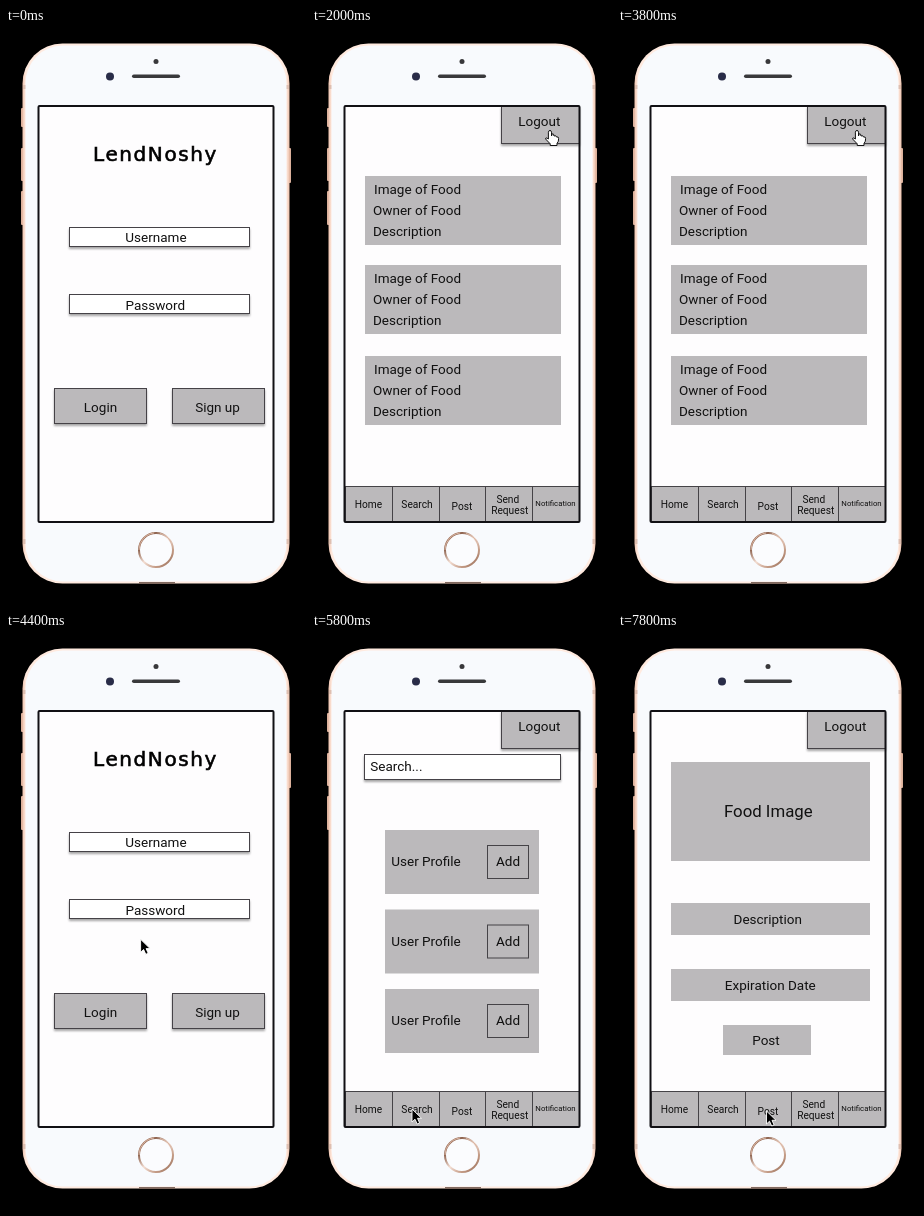
Animation, 300 px wide and 577 px high, one loop 8000 ms. Source, as an HTML page:

```html
<!DOCTYPE html>
<html lang="en">
<head>
<meta charset="utf-8">
<title>Food sharing app walkthrough</title>
<style>
html, body { margin: 0; width: 100%; height: 100%; overflow: hidden; background: #000; }
svg { display: block; width: 100%; height: 100%; }
text { font-family: Roboto, Arial, sans-serif; font-size: 13.5px; fill: #111; }
.title { font-family: "DejaVu Sans", sans-serif; font-size: 20px; letter-spacing: 1.6px; fill: #000; stroke: #000; stroke-width: .6; }
.tab { font-size: 10.2px; text-anchor: middle; }
</style>
</head>
<body>
<svg id="stage" viewBox="0 0 300 577" xmlns="http://www.w3.org/2000/svg">
  <defs>
    <linearGradient id="rim" x1="0" x2="1" y1="0" y2="0">
      <stop offset="0" stop-color="#eec3ae"/>
      <stop offset=".012" stop-color="#ffeadf"/>
      <stop offset=".988" stop-color="#ffeadf"/>
      <stop offset="1" stop-color="#eec3ae"/>
    </linearGradient>
    <linearGradient id="ring" x1="0" x2="1" y1="0" y2="1">
      <stop offset="0" stop-color="#b98970"/>
      <stop offset=".25" stop-color="#8f6551"/>
      <stop offset=".5" stop-color="#f3ddd2"/>
      <stop offset=".75" stop-color="#c39a84"/>
      <stop offset="1" stop-color="#8f6551"/>
    </linearGradient>
    <filter id="shadow" x="-10%" y="-20%" width="120%" height="160%">
      <feDropShadow dx="0" dy="2" stdDeviation="1" flood-color="#000" flood-opacity=".35"/>
    </filter>
  </defs>
  <rect width="300" height="577" fill="#000"/>

  <g id="phone">
    <g fill="#dcb19c">
      <rect x="15" y="80" width="3" height="19" rx="1"/>
      <rect x="15" y="120" width="3" height="33" rx="1"/>
      <rect x="15" y="163" width="3" height="34" rx="1"/>
      <rect x="282" y="120" width="3" height="35" rx="1"/>
    </g>
    <rect x="16.5" y="15.5" width="267" height="540" rx="40" fill="url(#rim)"/>
    <g fill="#dfbfb0">
      <rect x="17" y="57" width="3" height="4"/>
      <rect x="280" y="57" width="3" height="4"/>
      <rect x="17" y="511" width="3" height="5"/>
      <rect x="280" y="511" width="3" height="5"/>
    </g>
    <rect x="19.5" y="17.5" width="261" height="536" rx="37.5" fill="#f8fafd"/>
    <rect x="133" y="554" width="36" height="2" fill="#80695f"/>
    <circle cx="150" cy="33.5" r="2.5" fill="#38383b"/>
    <circle cx="104" cy="48.5" r="4" fill="#292c48"/>
    <rect x="126" y="46.5" width="48" height="3.5" rx="1.75" fill="#39393b"/>
    <circle cx="150" cy="522" r="17" fill="#fbfcfe" stroke="url(#ring)" stroke-width="2"/>
    <path d="M148 505A17 17 0 0 0 133 522M165 514A17 17 0 0 0 154 505.5" fill="none" stroke="#d8b5a3" stroke-width="1"/>
  </g>

  <rect x="33" y="78" width="234" height="416" fill="#fefdfe"/>
  <g id="screens"></g>
  <rect x="32.5" y="78" width="235" height="416" rx="1" fill="none" stroke="#111014" stroke-width="2"/>

  <g id="cursor">
    <path id="arrow" d="M0 0V13L3 10.2L5.2 15L7.6 14L5.5 9.3H9.5Z" fill="#000" stroke="#fff" stroke-width=".9"/>
    <path id="hand" d="M-1.6 1.2Q-1.3-.6 0-.6T1.5 1.2V5Q3-.0 4 5Q6 3.8 6.5 6Q8.6 5.2 8.6 7.6Q8.8 10.6 7 12.4V14.5H.2V12.8L-4.4 8Q-4.6 5.8-1.6 8Z" fill="#fff" stroke="#111" stroke-width="1" stroke-linejoin="round"/>
  </g>
</svg>
<script>
const LOOP = 8000, STEP = 200;
const GREY = '#bbb9bb', WHITE = '#fff', LINE = '#454347';
const byId = id => document.getElementById(id);

const box = (x, y, w, h, fill = GREY, extra = '') =>
  `<rect x="${x}" y="${y}" width="${w}" height="${h}" fill="${fill}" ${extra}/>`;
const outline = (x, y, w, h, fill) =>
  box(x + .5, y + .5, w - 1, h - 1, fill, `stroke="${LINE}"`);
const raised = (...args) => `<g filter="url(#shadow)">${outline(...args)}</g>`;
const label = (x, y, str, extra = '') => `<text x="${x}" y="${y}" ${extra}>${str}</text>`;
const mid = (x, y, str, size = 13.5) =>
  label(x, y, str, `text-anchor="middle" style="font-size:${size}px"`);
const tab = (x, y, str, size = 10.2) => label(x, y, str, `class="tab" style="font-size:${size}px"`);

// Parts shared by every screen behind the login
const frame = () =>
  raised(189, 78, 79, 38) + label(206.3, 98, 'Logout') +
  [33, 80, 127, 173, 220].map((x, i, all) =>
    outline(x, 458, (all[i + 1] || 267) - x + 1, 36)).join('') +
  tab(56.5, 480, 'Home') + tab(105, 480, 'Search') + tab(150, 481.5, 'Post') +
  tab(195.8, 474.5, 'Send') + tab(197.7, 486, 'Request') + tab(243.5, 478, 'Notification', 7.8);

const foodCard = y =>
  box(53, y, 196, 69) + label(62, y + 18, 'Image of Food') +
  label(61, y + 39, 'Owner of Food') + label(61, y + 59.7, 'Description');

const userCard = y =>
  box(73, y, 154, 64) + label(79.3, y + 36, 'User Profile') +
  outline(175, y + 15, 42, 34) + mid(196, y + 36, 'Add');

const screens = {
  login:
    label(87, 133, 'LendNoshy', 'class="title"') +
    raised(63, 199, 181, 20, WHITE) + mid(150, 214, 'Username') +
    raised(63, 266, 181, 20, WHITE) + mid(149.3, 282, 'Password') +
    raised(48, 360, 93, 36) + mid(94.5, 384, 'Login') +
    raised(166, 360, 93, 36) + mid(211.5, 384, 'Sign up'),
  home: frame() + [148, 237, 328].map(foodCard).join(''),
  search: frame() + raised(52, 121, 197, 26, WHITE) + label(58.3, 138, 'Search...') +
    [197, 276.5, 356].map(userCard).join(''),
  post: frame() +
    box(53, 129, 199, 99) + mid(150.3, 184, 'Food Image', 16.8) +
    box(53, 270, 199, 32) + mid(149.7, 290.5, 'Description') +
    box(53, 336, 199, 32) + mid(152.3, 356.5, 'Expiration Date') +
    box(105, 392, 88, 30) + mid(148, 412, 'Post')
};

byId('screens').innerHTML = Object.entries(screens)
  .map(([name, body]) => `<g id="${name}">${body}</g>`).join('');

// When each screen opens
const visits = [
  [0, 'login'], [1000, 'home'], [2200, 'login'], [3000, 'home'],
  [4000, 'login'], [4800, 'home'], [5800, 'search'], [7800, 'post']
];

// Pointer stops: time, x, y
const path = [
  [200, 258, 330], [800, 111.5, 382], [1200, 111.5, 382],
  [2000, 238, 103], [2200, 238, 103], [2800, 233, 375], [3200, 233, 375],
  [3800, 239, 103], [4000, 239, 103], [4600, 98, 377.5], [5000, 98, 377.5],
  [5600, 100, 476], [6000, 100, 476], [6600, 192, 318], [7200, 154, 450],
  [7400, 154, 450], [7600, 148.5, 478], [8000, 148.5, 478]
];
const pressing = [800, 2000, 2800, 3800, 4600, 5600, 6600, 7600];

const ease = p => p * p * (3 - 2 * p);

function pointerAt(t) {
  const i = Math.max(1, path.findIndex(k => k[0] >= t));
  const [t0, x0, y0] = path[i - 1], [t1, x1, y1] = path[i];
  const p = ease((t - t0) / (t1 - t0));
  return [x0 + (x1 - x0) * p, y0 + (y1 - y0) * p];
}

const show = (id, on) => byId(id).setAttribute('display', on ? 'inline' : 'none');

function draw(ms) {
  const t = Math.floor(ms % LOOP / STEP) * STEP;
  const current = visits.filter(v => v[0] <= t).pop()[1];
  for (const name in screens) show(name, name === current);

  show('cursor', t >= path[0][0]);
  if (t >= path[0][0]) {
    const [x, y] = pointerAt(t);
    byId('cursor').setAttribute('transform', `translate(${x.toFixed(1)} ${y.toFixed(1)})`);
    const isHand = pressing.includes(t);
    show('hand', isHand);
    show('arrow', !isHand);
  }
}

const start = performance.now();
function tick() {
  draw(performance.now() - start);
  requestAnimationFrame(tick);
}
tick();
</script>
</body>
</html>
```
